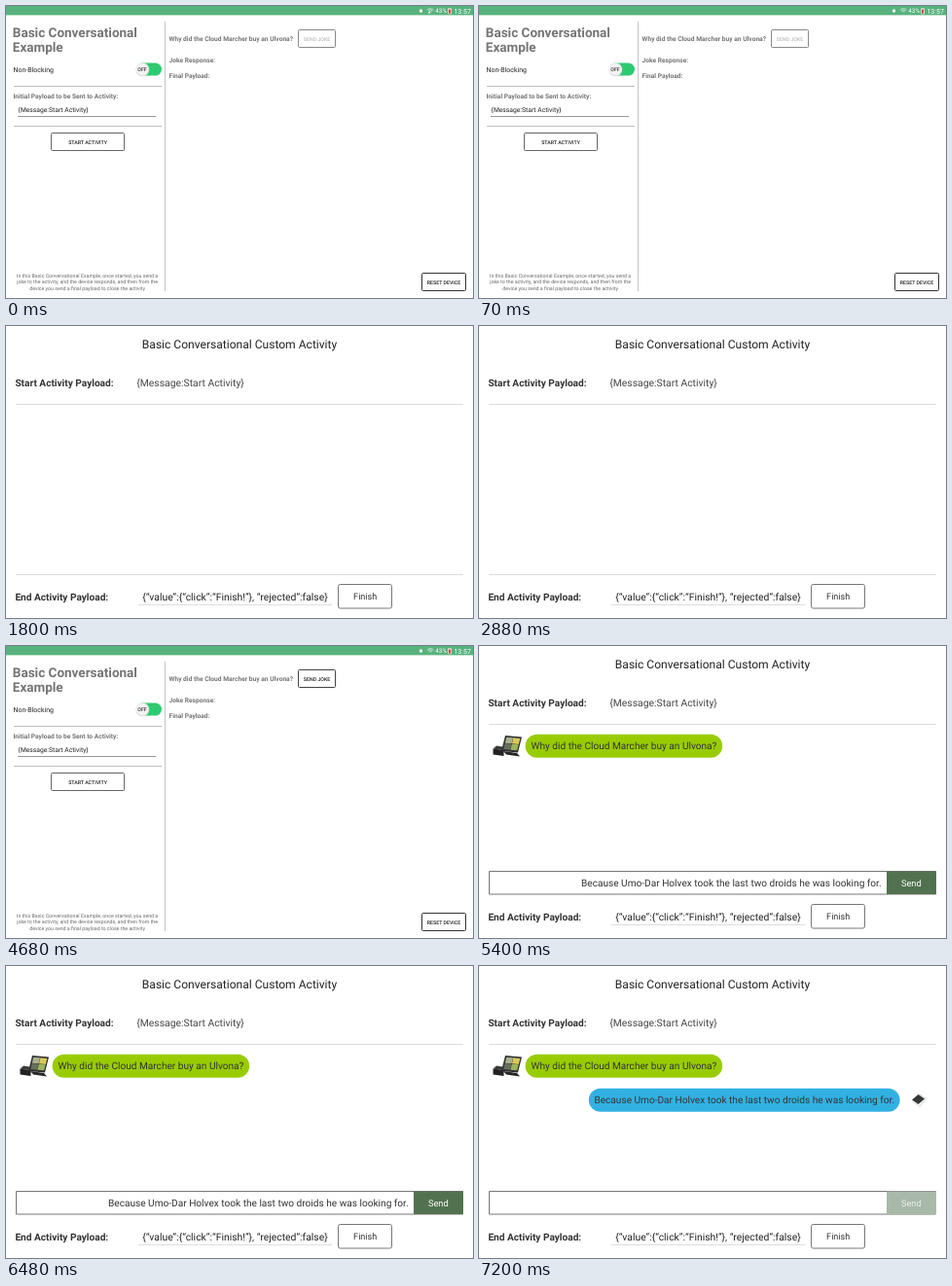
An HTML page with a canvas that plays this animation: 480 px wide and 300 px high, repeating every 8 s.

```html
<!DOCTYPE html>
<html lang="en">
<head>
<meta charset="utf-8">
<title>Conversational activity demo</title>
<style>
html, body { margin: 0; width: 100%; height: 100%; overflow: hidden; background: #fff; }
canvas { display: block; width: 480px; height: 300px; }
</style>
</head>
<body>
<canvas id="stage"></canvas>
<script>
const W = 480, H = 300, LOOP = 8000, STEP = 1800;
const canvas = document.getElementById('stage');
const ctx = canvas.getContext('2d');
const dpr = window.devicePixelRatio || 1;
canvas.width = W * dpr;
canvas.height = H * dpr;
ctx.scale(dpr, dpr);
ctx.textRendering = 'geometricPrecision';

const JOKE = 'Why did the Cloud Marcher buy an Ulvona?';
const REPLY = 'Because Umo-Dar Holvex took the last two droids he was looking for.';
const MESSAGE = '{Message:Start Activity}';
const INK = '#222', DARK = '#333', GRAY = '#757575';

function text(str, x, y, size, color = INK, weight = 400, align = 'left') {
  ctx.font = `${weight} ${size}px Roboto, sans-serif`;
  ctx.textAlign = align;
  ctx.fillStyle = color;
  ctx.fillText(str, x, y);
}

const centered = (str, x, y, size, color, weight) => text(str, x, y, size, color, weight, 'center');

function rect(x, y, w, h, color) {
  ctx.fillStyle = color;
  ctx.fillRect(x, y, w, h);
}

const rule = (x, y, w, color) => rect(x, y, w, 1, color);

function box(x, y, w, h, r, fill, stroke) {
  ctx.beginPath();
  ctx.roundRect(x, y, w, h, r);
  ctx.fillStyle = fill;
  ctx.fill();
  if (!stroke) return;
  ctx.strokeStyle = stroke;
  ctx.lineWidth = 1;
  ctx.stroke();
}

function circle(x, y, r, color) {
  ctx.beginPath();
  ctx.arc(x, y, r, 0, Math.PI * 2);
  ctx.fillStyle = color;
  ctx.fill();
}

// Parallelogram with one corner at (x, y) and sides u and v.
function panel(color, x, y, ux, uy, vx, vy) {
  ctx.beginPath();
  ctx.moveTo(x, y);
  ctx.lineTo(x + ux, y + uy);
  ctx.lineTo(x + ux + vx, y + uy + vy);
  ctx.lineTo(x + vx, y + vy);
  ctx.fillStyle = color;
  ctx.fill();
}

function button(label, x, y, w, border, color) {
  box(x, y, w, 18, 1, '#fff', border);
  centered(label, x + w / 2, y + 11, 5.25, color, 500);
}

function statusBar(receiving) {
  rect(0, 0, W, 9.4, '#58b27e');
  circle(426.5, 5, 1.7, '#fff');
  ctx.strokeStyle = '#e4f3ea';
  ctx.lineWidth = 0.7;
  for (let r = 1.8; r < 5; r += 1.5) {
    ctx.beginPath();
    ctx.arc(436.2, 7.4, r, -Math.PI * 0.75, -Math.PI * 0.25);
    ctx.stroke();
  }
  if (receiving) circle(435, 6.8, 0.9, '#fff');
  text('43%', 441.3, 7.3, 6.3, '#fff');
  box(454.2, 2.2, 3.8, 6, 0.5, '#f1dfdc');
  rect(455, 3.6, 2.2, 4, '#d64b45');
  text('13:57', 460.4, 7.5, 7, '#fff');
}

function toggle() {
  box(134, 58.6, 26, 13, 6.5, '#2dcb70');
  circle(140.4, 65.4, 6.9, '#cfd5d1');
  circle(140.2, 65, 6.4, '#f3f3f3');
  centered('OFF', 140, 67, 5.25, DARK, 500);
}

function controlScreen(canSend, receiving) {
  const heading = (str, y) => text(str, 6.8, y, 13.5, GRAY, 700);
  const label = (str, x, y) => text(str, x, y, 6.65, GRAY, 700);

  statusBar(receiving);
  heading('Basic Conversational', 31.5);
  heading('Example', 47.3);
  text('Non-Blocking', 7.4, 67.9, 7);
  toggle();
  rule(8, 82, 152, '#bdbdbd');
  label('Initial Payload to be Sent to Activity:', 7.4, 94.6);
  text(MESSAGE, 12.6, 109.2, 6.75);
  rule(12, 113, 142, '#959595');
  rule(8, 123, 152, '#bdbdbd');
  button('START ACTIVITY', 46.5, 130.5, 75, '#666', INK);
  [
    'In this Basic Conversational Example, once started, you send a',
    'joke to the activity, and the device responds, and then from the',
    'device you send a final payload to close the activity'
  ].forEach((line, i) => centered(line, 83.6, 279.2 + i * 6.15, 5.25, '#666'));

  rect(163, 16, 1, 277, '#c4c4c4');
  label(JOKE, 167.6, 35.5);
  button('SEND JOKE', 300.5, 24.5, 38, canSend ? '#444' : '#888', canSend ? INK : '#bbb');
  label('Joke Response:', 167.6, 57.7);
  label('Final Payload:', 167.6, 74.4);
  button('RESET DEVICE', 427.5, 274.5, 45, DARK, INK);
}

function activityScreen() {
  const row = (name, y) => text(name, 9.4, y, 10.125, DARK, 700);

  centered('Basic Conversational Custom Activity', 240, 22.8, 12.07);
  row('Start Activity Payload:', 62.4);
  text(MESSAGE, 134.3, 62.4, 10.37, '#444');
  rule(10, 80, 460, '#dcdcdc');
  rule(10, 255, 460, '#dcdcdc');
  row('End Activity Payload:', 281.5);
  text('{“value”:{“click”:“Finish!”}, “rejected”:false}', 140.2, 281.5, 10.37);
  rule(136, 286, 199, '#dedede');
  box(341.5, 265.5, 55, 24.5, 2, '#fff', '#777');
  centered('Finish', 369.2, 281.2, 9.1, DARK);
}

function terminal() {
  panel('#262626', 25, 108, 14, 2, 3, 3.5);
  panel('#222', 14.5, 105.5, 11, 1.5, 0, 6);
  panel('#3b3b3b', 18, 102.5, 9, 1.5, -3.5, 3);
  panel('#303030', 27, 92, 17, 1.5, -4, 16);
  // Two rows of tiles on the slanted display.
  ['#a9b08f', '#d9c95a', '#66705c', '#9db35c'].forEach((color, i) => {
    const col = i % 2, line = i >> 1;
    panel(color, 28.2 + col * 7.2 - line * 1.6, 93.7 + col * 0.6 + line * 6.4, 6.9, 0.6, -1.5, 6);
  });
}

function cardReader() {
  panel('#dedede', 452.5, 131, 8, 5.5, -7.5, 8.5);
  panel('#f4f4f4', 452, 132, 7, 5, -6.5, 7);
  panel('#35373a', 451.5, 132, 6.5, 4.5, -6.5, 5.5);
}

function bubble(str, x, y, w, color) {
  box(x, y, w, 24, 12, color);
  centered(str, x + w / 2, y + 15.7, 10.125, DARK);
}

function chat(replied) {
  terminal();
  bubble(JOKE, 47.6, 90.7, 202.6, '#99cc00');
  if (replied) {
    bubble(REPLY, 112.8, 125.7, 319.8, '#31b1e2');
    cardReader();
  }
  rect(10, 255, 460, 1, '#fff');
  box(10.5, 231.5, 459, 23.5, 0, '#fff', '#777');
  rect(419, 231.5, 51, 23.5, replied ? '#a9b9a9' : '#52724f');
  centered('Send', 444.3, 247, 9.3, replied ? '#e9eee9' : '#fff');
  if (!replied) text(REPLY, 413.6, 247, 10.125, DARK, 400, 'right');
}

// The two screens alternate with hard cuts, one step each.
function draw(t) {
  const step = Math.floor(t / STEP);
  rect(0, 0, W, H, '#fff');
  if (step === 0 || step === 2) {
    controlScreen(step === 2, t < 70);
  } else {
    activityScreen();
    if (step > 2) chat(step === 4);
  }
}

const start = performance.now();
function tick() {
  draw((performance.now() - start) % LOOP);
  requestAnimationFrame(tick);
}
tick();
</script>
</body>
</html>
```
